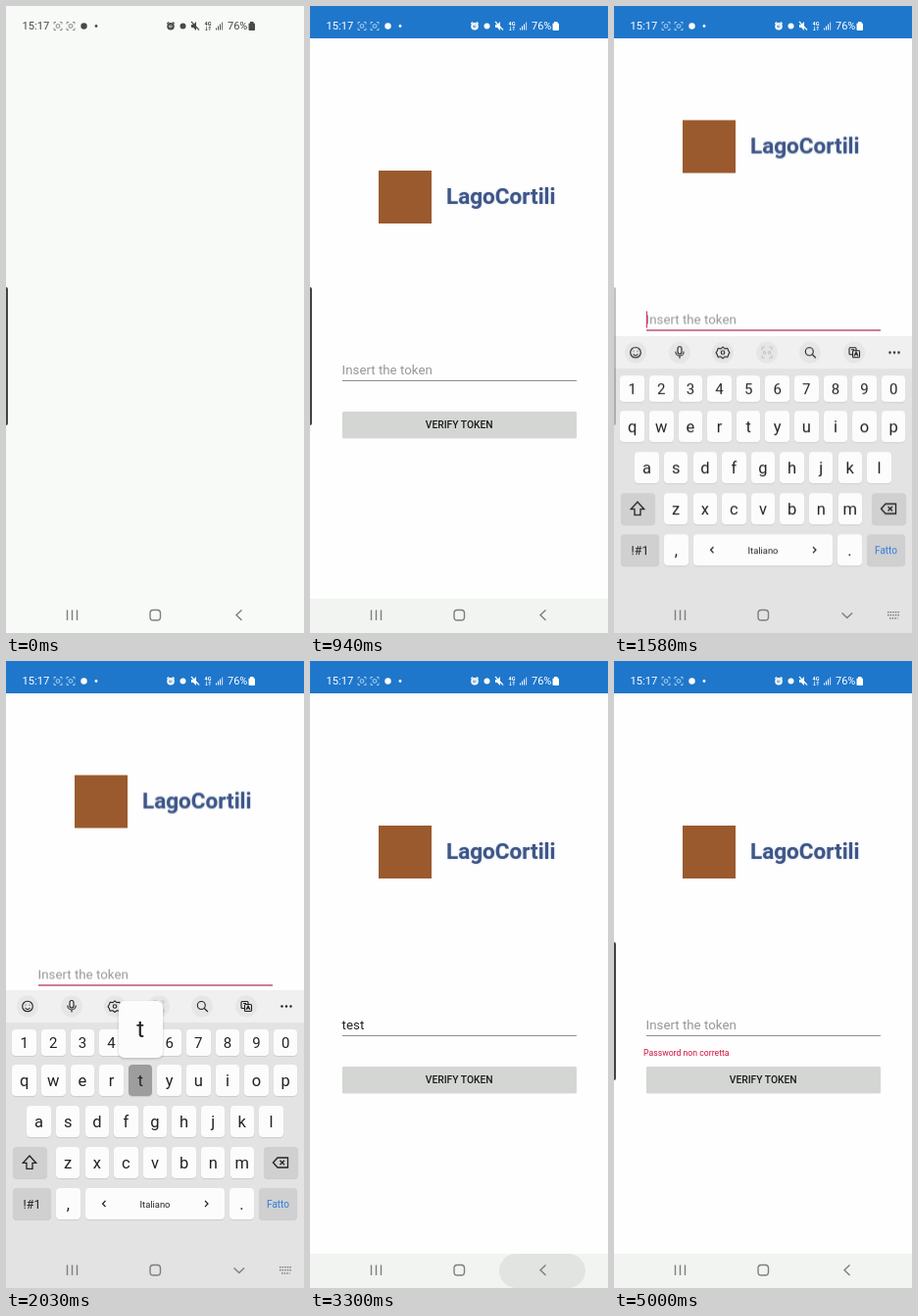
Animation of 304 by 640 pixels, one loop 5030 ms. Source, as an HTML page:

```html
<!DOCTYPE html>
<html lang="en">
<head>
<meta charset="utf-8">
<title>Token check</title>
<style>
html, body { margin: 0; width: 100%; height: 100%; overflow: hidden; background: #f8faf8; }
#stage { position: relative; width: 304px; height: 640px; overflow: hidden; background: #f8faf8; font-family: Roboto, sans-serif; }
#stage div, #stage svg { position: absolute; }
svg { left: 0; top: 0; fill: none; stroke: currentColor; overflow: visible; }
.solid { fill: currentColor; stroke: none; }
.text { line-height: 20px; white-space: pre; }

#app { inset: 0; background: #fdfefd; }
#bar { width: 304px; height: 33px; background: #1f77cb; }
#status { color: #fff; width: 304px; height: 33px; }
#page { width: 304px; height: 605px; }
#mark { left: 70px; top: 168px; width: 54px; height: 54px; background: #9b5a2e; }
#brand { left: 139px; top: 184px; font-size: 22.5px; font-weight: 700; color: #3f5688; text-shadow: 0 0 2px #b4c0da; }
#hint, #value { left: 32.6px; top: 362px; font-size: 13.3px; }
#hint { color: #969796; }
#value { color: #222; }
#value span { font-size: 0; }
#value #caret { display: inline-block; width: 1.3px; height: 17px; margin-right: -2px; vertical-align: -4px; background: #d3286c; }
#line { left: 33px; top: 382px; width: 239px; height: 1px; background: #8d8e8d; }
#focus { left: 33px; top: 381.5px; width: 239px; height: 1.6px; background: #cf3778; }
#error { left: 30px; top: 389.5px; font-size: 8.7px; color: #d3123f; }
#verify { left: 32.5px; top: 414px; width: 239.5px; height: 27px; border-radius: 1.5px; overflow: hidden; background: #d4d6d4; color: #1c1c1c; font-size: 10.3px; font-weight: 500; text-align: center; line-height: 27px; box-shadow: 0 .5px 1px #0002; }
#ink { left: 97px; top: -9px; width: 46px; height: 46px; border-radius: 50%; background: #000; opacity: 0; }
#navbg { top: 605px; width: 304px; height: 35px; background: #f2f4f2; }
#pill { left: 193px; top: 605px; width: 88px; height: 35px; border-radius: 17.5px; background: #e2e4e2; }

#board { top: 336px; width: 304px; height: 304px; background: #e2e3e2; color: #222; }
#tools { width: 304px; height: 33px; background: #eff0ef; }
.key { display: flex; align-items: center; justify-content: center; border-radius: 4px; background: #fbfcfb; box-shadow: 0 .7px .8px #0002; font-size: 16.5px; }
.num { font-size: 15px; }
.dark { background: #cfd0cf; font-size: 12.5px; }
.down { background: #9c9d9c; box-shadow: none; }
.pop { border-radius: 6px; font-size: 24px; box-shadow: 0 1px 3px #0003; }
.space { font-size: 9.4px; }
.done { font-size: 10px; color: #2d7be0; }
#nav { color: #7e7f7e; width: 304px; height: 640px; }
#handle { top: 287px; width: 2.2px; height: 141px; border-radius: 0 2px 2px 0; background: #434443; }
</style>
</head>
<body>
<div id="stage">
  <div id="app">
    <div id="page">
      <div id="mark"></div>
      <div id="brand" class="text">LagoCortili</div>
      <div id="hint" class="text">Insert the token</div>
      <div id="value" class="text"><span id="c0">t</span><span id="c1">e</span><span id="c2">s</span><span id="c3">t</span><span id="caret"></span></div>
      <div id="line"></div>
      <div id="focus"></div>
      <div id="error" class="text">Password non corretta</div>
      <div id="verify"><div id="ink"></div>VERIFY TOKEN</div>
    </div>
    <div id="bar"></div>
    <div id="navbg"></div>
    <div id="pill"></div>
  </div>

  <div id="status">
    <div class="text" style="left:16.5px;top:10.5px;font-size:11.2px">15:17</div>
    <div class="text" style="left:226px;top:10.5px;font-size:11px">76%</div>
    <svg width="304" height="33">
      <g id="shot" stroke-width=".8" opacity=".8">
        <path d="M49 18.5v-2h2M55 16.5h2v2M57 22.5v2h-2M51 24.5h-2v-2"/>
        <rect x="51.3" y="18.8" width="3.4" height="3.4" rx=".6"/>
      </g>
      <use href="#shot" x="13"/>
      <g class="solid">
        <circle cx="79.5" cy="20.5" r="3.2"/>
        <circle cx="92" cy="20.5" r="1.4"/>
        <circle cx="180.5" cy="20.5" r="3"/>
        <path d="M189 19h2l3-3v9l-3-3h-2z"/>
        <path d="M214 24.5v-2h1v2zM216 24.5v-4h1v4zM218 24.5v-6h1v6zM220.3 24.5v-8h.8v8z"/>
        <rect x="247.5" y="17.5" width="6.5" height="7.5" rx="1"/>
        <rect x="249" y="16" width="3.5" height="2"/>
      </g>
      <circle cx="168" cy="20.7" r="2.7" stroke-width="2.1"/>
      <path d="M168 19v2h1.5M164.2 18l2-1.7M171.8 18l-2-1.7M189 16l8 8.5" stroke-width="1.1"/>
      <path d="M204.5 21v4M203.3 23.8l1.2 1.2 1.2-1.2M207.8 25v-4M206.6 22.2l1.2-1.2 1.2 1.2" stroke-width=".7"/>
    </svg>
    <div class="text" style="left:202.5px;top:7.5px;font-size:5.5px;font-weight:700">4G</div>
  </div>

  <div id="board">
    <div id="tools">
      <svg width="304" height="33" stroke-width="1.1">
        <g id="discs" fill="#e5e6e5" stroke="none"></g>
        <circle cx="22" cy="16.5" r="5.3"/>
        <path d="M19.5 18q2.5 3.2 5 0M20 14.8v.8M24 14.8v.8"/>
        <rect x="65" y="10.5" width="4" height="7.5" rx="2"/>
        <path d="M62.8 15.5a4.2 4.5 0 0 0 8.4 0M67 20v2.5"/>
        <path d="M111 10.7l2 1.7 2.9-.3.8 2.5 1.3 1.9-1.3 1.9-.8 2.5-2.9-.3-2 1.7-2-1.7-2.9.3-.8-2.5-1.300-1.900 1.300-1.900.8-2.500 2.900.3z" transform="translate(0 .2)" stroke-linejoin="round"/>
        <circle cx="111" cy="16.5" r="1.8"/>
        <g stroke="#c3c4c3">
          <path d="M151 14v-3h3M158 11h3v3M161 19v3h-3M154 22h-3v-3"/>
          <circle cx="153.5" cy="16.5" r="1.3"/><circle cx="158.5" cy="16.5" r="1.3"/>
        </g>
        <circle cx="199.3" cy="15.5" r="4"/>
        <path d="M202.3 18.5l3.5 3.5"/>
        <rect x="240" y="11.5" width="7" height="7" rx="1"/>
        <rect x="243.5" y="14.5" width="7" height="7" rx="1" fill="#e5e6e5"/>
        <path d="M245 20l2-4 2 4M245.7 18.7h2.6M242 13.5h3"/>
        <g class="solid"><circle cx="281.5" cy="16.5" r="1.2"/><circle cx="286" cy="16.5" r="1.2"/><circle cx="290.5" cy="16.5" r="1.2"/></g>
      </svg>
    </div>
  </div>

  <div id="nav">
    <svg width="304" height="640" stroke-width="1.4">
      <path d="M62.5 616.5v10.5M67.5 616.5v10.5M72.5 616.5v10.5"/>
      <rect x="147" y="616.5" width="10.5" height="10.5" rx="3.3"/>
      <path id="back" d="M240.5 616.5l-5.5 5.3 5.5 5.3"/>
      <g id="hide">
        <path d="M232.5 619.5l5.3 5 5.3-5"/>
        <path d="M279 618.8h12.5M279 621.8h12.5M281 625h8.5" stroke-dasharray="1.5 1.1"/>
      </g>
    </svg>
  </div>
  <div id="handle"></div>
</div>

<script>
const LOOP = 5030;
const CLEAR = 4150;
const board = document.getElementById('board');
const presses = [['t', 1990, 2110], ['e', 2190, 2290], ['s', 2390, 2480], ['t', 2570, 2660]];
const spots = {};
const rules = [];

// Stops are [ms, declarations].
function animate(sel, stops, ease = 'linear') {
  const name = 'k' + rules.length;
  const body = stops.map(([ms, css]) => `${ms / LOOP * 100}%{${css}}`).join('');
  rules.push(`@keyframes ${name}{${body}}${sel}{animation:${name} ${LOOP}ms ${ease} infinite}`);
}

// Hard on/off switch over [from, to] spans.
function show(sel, ...spans) {
  animate(sel, [[0, 'opacity:0'],
    ...spans.flatMap(([a, b]) => [[a, 'opacity:1'], [b, 'opacity:0']])], 'step-end');
}

// Moves with the keyboard: out at 1250 ms, back at 3000 ms.
function slide(sel, from, to, opened, hidden) {
  const out = 'animation-timing-function:cubic-bezier(.25,.46,.45,.94)';
  const y = v => `transform:translateY(${v}px);`;
  animate(sel, [[0, y(from)], [1250, y(from) + out], [opened, y(to)],
    [3000, y(to) + out], [hidden, y(from)], [LOOP, y(from)]]);
}

function addKey(label, cx, cy, w = 24.5, h = 32, cls = '') {
  const el = document.createElement('div');
  el.className = 'key ' + cls;
  el.innerHTML = label;
  el.style.cssText = `left:${cx - w / 2}px;top:${cy - h / 2}px;width:${w}px;height:${h}px`;
  board.append(el);
  spots[label] ??= [cx, cy];
  return el;
}

function addRow(chars, x, y, h, cls) {
  [...chars].forEach((c, i) => addKey(c, x + i * 29.6, y, 24.5, h, cls));
}

const icon = path => `<svg style="position:static" width="16" height="16" stroke-width="1.3"><path d="${path}"/></svg>`;

document.getElementById('discs').innerHTML =
  [22, 67, 111, 156, 200, 245].map(x => `<circle cx="${x}" cy="16.5" r="11"/>`).join('');

addRow('1234567890', 18.7, 53.5, 27, 'num');
addRow('qwertyuiop', 18.7, 92);
addRow('asdfghjkl', 33.6, 134);
addRow('zxcvbnm', 63.2, 176);
addKey(icon('M8 1l6.7 7.3h-3.7v6H5v-6H1.300z'), 24.3, 176, 35, 32, 'dark');
addKey(icon('M.5 8l4.500-5h10.500v10H5zM7.500 5.700l4.500 4.500M12 5.700l-4.500 4.500'), 280, 176, 35, 32, 'dark');
addKey('!#1', 26.5, 218, 39, 32, 'dark');
addKey(',', 63.3, 218);
addKey('Italiano', 152, 218, 142, 32, 'space');
addKey('.', 240.5, 218);
addKey('Fatto', 277.5, 218, 39, 32, 'dark done');
board.insertAdjacentHTML('beforeend',
  '<svg width="304" height="304" stroke-width="1.2"><path d="M101.5 215l-3 3 3 3M203 215l3 3-3 3"/></svg>');

presses.forEach(([c, from, to], i) => {
  const [x, y] = spots[c];
  addKey(c, x, y, 24.5, 32, 'down').id = 'd' + i;
  addKey(c, x, y - 52, 45, 58, 'pop').id = 'p' + i;
  show(`#d${i},#p${i}`, [from, to]);
  animate(`#value #c${i}`, [[0, 'font-size:0'], [from + 70, 'font-size:13.3px'], [CLEAR, 'font-size:0']], 'step-end');
});

// Opening fade
animate('#app', [[0, 'opacity:0'], [30, 'opacity:0'], [260, 'opacity:1'], [LOOP, 'opacity:1']]);
animate('#status', [[0, 'color:#484948'], [30, 'color:#484948'], [200, 'color:#fff'], [LOOP, 'color:#fff']]);

// Keyboard and page pan
slide('#board', 304, 0, 1592, 3270);
slide('#page', 0, -51.5, 1520, 3230);
show('#focus', [1240, 3040]);
show('#value #caret', [1250, 1750], [2060, 3040]);
show('#hide', [1290, 3180]);
animate('#back', [[0, 'opacity:1'], [1290, 'opacity:0'], [3180, 'opacity:1']], 'step-end');
animate('#handle', [[0, 'opacity:1'], [1500, 'opacity:1'], [1620, 'opacity:0'],
  [3330, 'opacity:0'], [3430, 'opacity:1'], [LOOP, 'opacity:1']]);
animate('#pill', [[0, 'opacity:0'], [2970, 'opacity:0;transform:scaleX(.5)'], [3080, 'opacity:1;transform:none'],
  [3310, 'opacity:1'], [3450, 'opacity:0'], [LOOP, 'opacity:0']]);

// Check and result
animate('#ink', [[0, 'opacity:0;transform:scale(.3)'], [3940, 'opacity:0;transform:scale(.3)'],
  [3990, 'opacity:.13'], [4200, 'opacity:.13;transform:scale(5.5)'],
  [4420, 'opacity:0;transform:scale(5.5)'], [LOOP, 'opacity:0;transform:scale(5.5)']]);
animate('#hint', [[0, 'opacity:1'], [2060, 'opacity:0'], [CLEAR, 'opacity:1']], 'step-end');
show('#error', [CLEAR, LOOP]);

const style = document.createElement('style');
style.textContent = rules.join('\n');
document.head.append(style);
</script>
</body>
</html>
```
